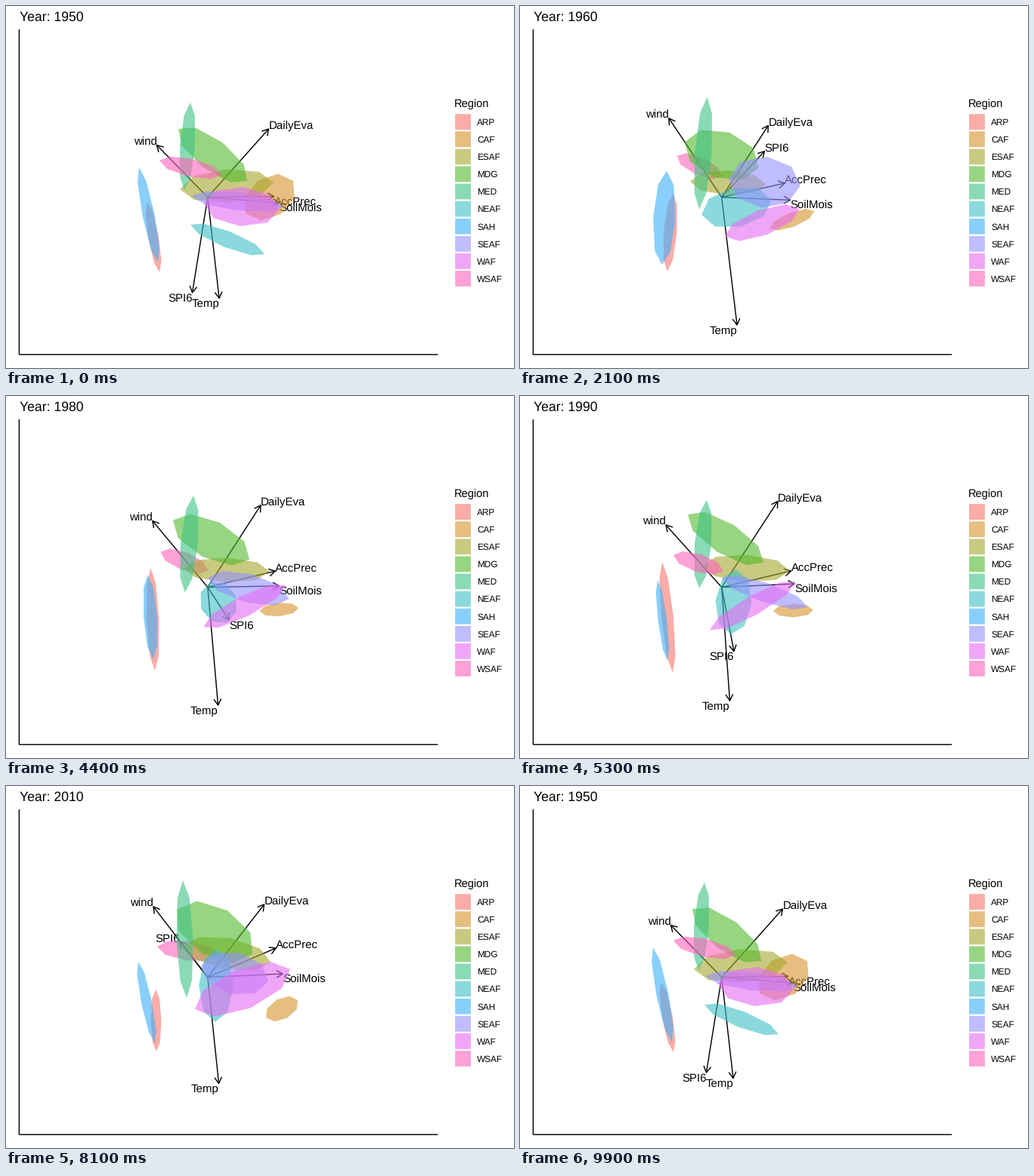
A matplotlib script for the animation above (10000 ms loop, 672 px wide and 480 px high).

```python
import numpy as np
import matplotlib.pyplot as plt
from matplotlib.animation import FuncAnimation
from matplotlib.patches import Polygon, Rectangle

W, H, DPI = 672, 480, 96
FRAMES, INTERVAL = 100, 100
LINE = 1.42 * 72 / DPI
LEFT, RIGHT, TOP, BOTTOM = 17.4, 571.3, 31, 462.2
ORIGIN = np.array([266.8, 253.6])
HEAD = 9.6
ALPHA = 0.6
ANGLES = np.arange(0, 2 * np.pi, np.pi / 4)

YEARS = [*range(1950, 2030, 10), 1950]
STARTS = [5, 18, 31, 44, 56, 69, 81, 93]
STEPS = [11, 11, 10, 10, 10, 9, 9, 7]

plt.rcParams["font.family"] = "Liberation Sans"
plt.rcParams["text.hinting"] = "no_hinting"


def ease(u):
    return np.sin(u * np.pi / 2)


def mix(a, b, k):
    return a + (b - a) * k


def rewind(seen, after, u):
    """State whose move towards `after` passes `seen` at share u."""
    k = ease(u)
    return (seen - k * after) / (1 - k)


def states(*poses):
    """Rest states of all decades, from poses met partly during the moves."""
    s50, p60, p70, s90, p00, p10 = np.array(poses, float)
    s60 = s50 + (p60 - s50) / ease(7 / 11)
    s80 = mix(p70, s90, 0.6)
    s20 = mix(p10, s50, 0.6)
    s70 = rewind(p70, s80, 2 / 10)
    s10 = rewind(p10, s20, 1 / 9)
    s00 = rewind(p00, s10, 1 / 9)
    return [s50, s60, s70, s80, s90, s00, s10, s20, s50]


def leaf(pose):
    """Eight-cornered outline between two end points with a half width."""
    a, b, width = pose[:2], pose[2:4], pose[4]
    axis = (b - a) / 2
    side = np.array([-axis[1], axis[0]]) / np.hypot(*axis) * width
    return (a + b) / 2 + np.outer(np.cos(ANGLES), axis) + np.outer(np.sin(ANGLES), side)


arrows = {
    "wind": states((199.5, 184.5), (198, 152.5), (195.5, 155),
                   (193, 171), (191.5, 199), (195, 160)),
    "DailyEva": states((347.5, 163), (334, 158), (329, 155.5),
                       (341, 139.5), (332.5, 195), (341.5, 157)),
    "AccPrec": states((354.5, 252.5), (351.5, 240), (351.5, 232.5),
                      (358.5, 232), (352.5, 242), (357, 215)),
    "SoilMois": states((361.5, 261), (359, 255.5), (358, 257.5),
                       (363, 249), (361, 251), (366, 249)),
    "SPI6": states((246.5, 380), (306, 232.5), (319, 215.5),
                   (283, 338.5), (266, 144), (230, 206.5)),
    "Temp": states((282, 387.5), (284.5, 413.5), (286.5, 422),
                   (277.5, 404), (294.4, 394), (281.5, 394.5)),
}

# Each outline: start x, y, end x, y, half width
regions = {
    "ARP": ("#F8766D", states(
        (187, 260, 203, 353, 7), (202, 247, 208, 347, 8), (198, 245, 187, 359, 9),
        (188, 220, 202, 367, 8), (204, 222, 206, 382, 13), (198, 270, 199, 352, 7))),
    "CAF": ("#D6932B", states(
        (317, 275, 380, 232, 27), (322, 300, 393, 265, 13), (336, 286, 385, 275, 9),
        (335, 285, 388, 284, 9), (343, 241, 367, 288, 14), (344, 307, 386, 284, 14))),
    "ESAF": ("#A5A82D", states(
        (230, 243, 354, 234, 22), (234, 228, 328, 238, 22), (222, 236, 333, 234, 13),
        (241, 225, 357, 232, 18), (238, 187, 364, 217, 26), (236, 212, 350, 233, 21))),
    "MDG": ("#52B92D", states(
        (228, 163, 319, 232, 21), (219, 172, 310, 227, 24), (219, 180, 322, 208, 34),
        (222, 157, 322, 221, 21), (224, 211, 314, 239, 24), (226, 164, 326, 223, 33))),
    "MED": ("#3DC284", states(
        (244, 128, 236, 244, 10), (244, 127, 238, 260, 10), (250, 120, 236, 271, 12),
        (247, 138, 237, 255, 11), (236, 143, 237, 282, 11), (234, 125, 239, 281, 11))),
    "NEAF": ("#3EC1C5", states(
        (244, 290, 342, 329, 11), (252, 264, 341, 266, 24), (241, 279, 316, 271, 26),
        (286, 230, 279, 316, 24), (246, 262, 307, 288, 25), (279, 216, 277, 313, 23))),
    "SAH": ("#3AB0FA", states(
        (176, 214, 201, 340, 8), (183, 217, 184, 344, 11), (198, 225, 194, 344, 15),
        (182, 244, 195, 351, 6), (181, 179, 206, 325, 8), (175, 233, 197, 341, 7))),
    "SEAF": ("#9590FF", states(
        (245, 252, 368, 266, 12), (280, 221, 384, 243, 29), (267, 241, 362, 247, 31),
        (267, 241, 381, 280, 13), (253, 271, 340, 269, 19), (258, 238, 347, 259, 28))),
    "WAF": ("#E76BF3", states(
        (262, 262, 362, 270, 26), (252, 308, 357, 273, 19), (281, 299, 378, 261, 16),
        (251, 310, 365, 246, 13), (258, 287, 362, 267, 31), (250, 296, 376, 243, 27))),
    "WSAF": ("#FF62BC", states(
        (203, 205, 285, 224, 12), (206, 204, 274, 221, 12), (207, 198, 265, 231, 12),
        (203, 211, 269, 232, 12), (202, 207, 276, 219, 11), (200, 213, 282, 224, 13))),
}

fig = plt.figure(figsize=(W / DPI, H / DPI), dpi=DPI, facecolor="white")
ax = fig.add_axes([0, 0, 1, 1])
ax.set_xlim(0, W)
ax.set_ylim(H, 0)
ax.axis("off")


def label(x, y, text, size):
    return ax.text(x, y, text, fontsize=size, color="black",
                   ha="left", va="baseline", zorder=2)


def stroke(xs=(), ys=()):
    return ax.plot(xs, ys, color="black", lw=LINE, zorder=1, snap=False,
                   solid_capstyle="butt", solid_joinstyle="round")[0]


stroke([LEFT, LEFT], [TOP, BOTTOM])
stroke([LEFT, RIGHT], [BOTTOM, BOTTOM])
title = label(17.7, 20, "", 13.2)

label(593, 134, "Region", 11)
for row, (name, (color, _)) in enumerate(regions.items()):
    y = 153.6 + 23.1 * row
    ax.add_patch(Rectangle((594.1, y - 10.4), 20.8, 20.8, fc=color,
                           alpha=ALPHA, lw=0, snap=False))
    label(623.4, y + 4.3, name, 8.8)

shafts = {name: stroke() for name in arrows}
heads = {name: stroke() for name in arrows}
names = {name: label(0, 0, name, 11.25) for name in arrows}
shapes = {name: ax.add_patch(Polygon(leaf(s[0]), fc=color, alpha=ALPHA, lw=0, zorder=3))
          for name, (color, s) in regions.items()}


def place_arrow(name, tip):
    shafts[name].set_data(*zip(ORIGIN, tip))
    dx, dy = ORIGIN - tip
    turn = np.arctan2(dy, dx) + np.array([-1, 0, 1]) * np.pi / 6
    reach = np.array([HEAD, 0, HEAD])
    x, y = tip
    heads[name].set_data(x + reach * np.cos(turn), y + reach * np.sin(turn))
    # Labels point away from the panel centre
    off = x - (LEFT + RIGHT) / 2
    side = "center" if abs(off) < 0.55 else "left" if off > 0 else "right"
    below = y > (TOP + BOTTOM) / 2
    names[name].set_ha(side)
    names[name].set_position((x, y + (11.8 if below else 0.3)))


def locate(frame):
    """Index of the current move and the share of it that is done."""
    move = max([i for i, s in enumerate(STARTS) if s <= frame], default=0)
    done = (frame - STARTS[move] + 1) / STEPS[move]
    return move, min(max(done, 0), 1)


def draw(frame):
    move, u = locate(frame)
    k = ease(u)
    title.set_text(f"Year: {YEARS[move + (u > 0.5)]}")
    for name, s in arrows.items():
        place_arrow(name, mix(s[move], s[move + 1], k))
    for name, (_, s) in regions.items():
        shapes[name].set_xy(leaf(mix(s[move], s[move + 1], k)))
    # The last region slips under the others while it moves
    shapes["WSAF"].set_zorder(2.5 if 0 < u < 1 else 3)
    return [title, *shafts.values(), *heads.values(), *names.values(),
            *shapes.values()]


anim = FuncAnimation(fig, draw, frames=FRAMES, interval=INTERVAL,
                     init_func=lambda: draw(0), repeat=True, repeat_delay=0)
plt.show()
```
